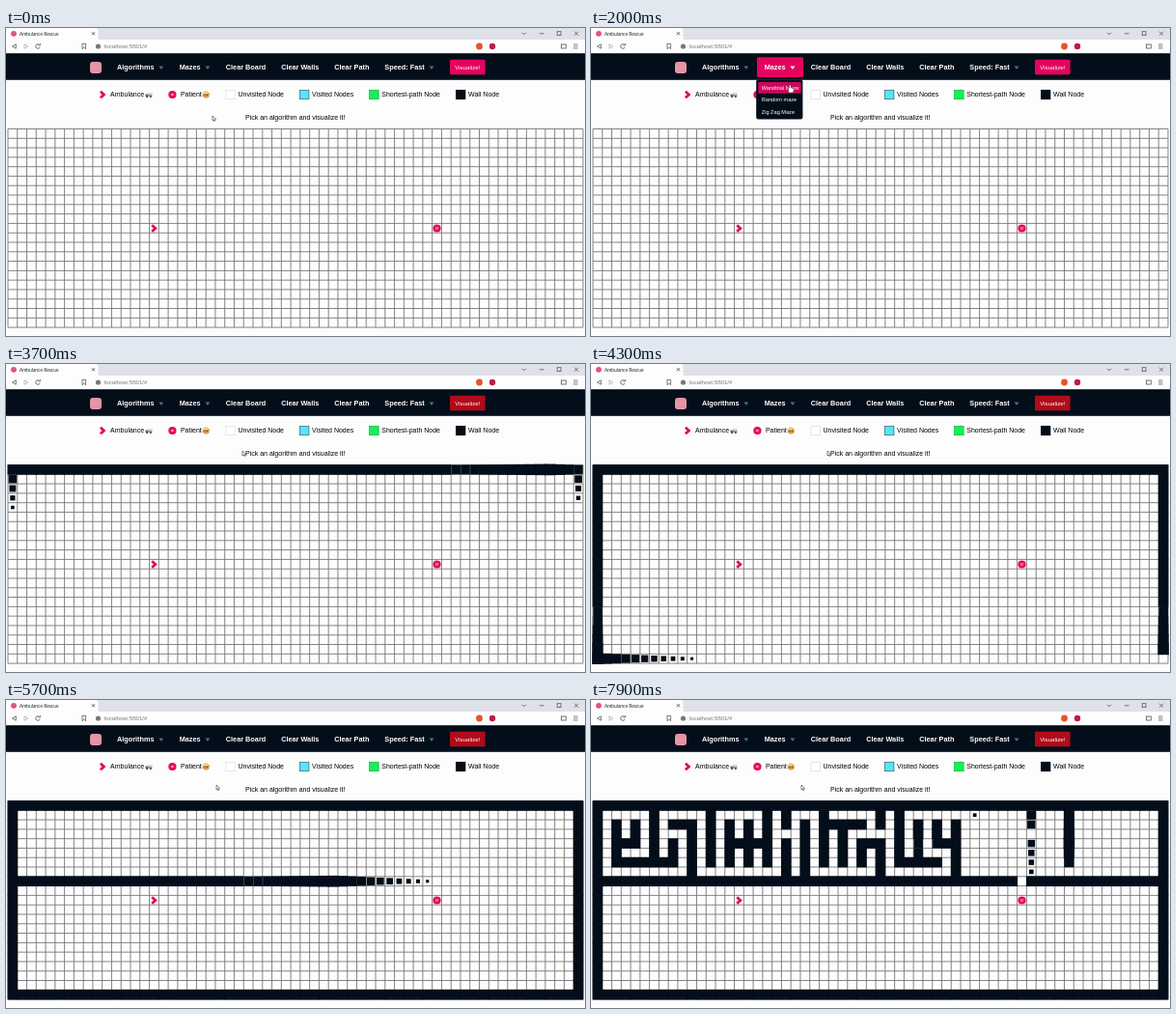
Recreate the animation shown at these times as an HTML page with a canvas. Size 600x319 px, loop 8 s.

```html
<!DOCTYPE html>
<html lang="en">
<head>
<meta charset="utf-8">
<title>Ambulance Rescue</title>
<style>
  html, body { margin: 0; width: 100%; height: 100%; overflow: hidden; background: #fdfdfd; }
  canvas { display: block; width: 600px; height: 319px; }
</style>
</head>
<body>
<canvas id="stage"></canvas>
<script>
const W = 600, H = 319, LOOP = 8000;
const canvas = document.getElementById('stage');
const dpr = window.devicePixelRatio || 1;
canvas.width = W * dpr;
canvas.height = H * dpr;
const g = canvas.getContext('2d');

const COLS = 61, ROWS = 21, X0 = 2, Y0 = 104.5, CW = 9.77, CH = 9.79;
const PAPER = '#fdfdfd', DARK = '#030e1a', PINK = '#e4045f', RED = '#b00b1b', INK = '#555';
const SANS = '"Liberation Sans", Arial, sans-serif';

const MENU_OPEN = 1500, PICKED = 2680, GROW = 300;

// pointer stops: arrival time, x, y
const STOPS = [[0, 214, 91], [1200, 196, 42], [1900, 206, 59], [3400, 245, 90], [5600, 218, 88]];
const GLIDE = 600;

// splits of the wide areas: wall position and its gap
const WIDE = [[8, 45], [38, 1], [22, 1], [10, 1], [6, 7], [12, 7], [20, 3], [18, 7],
  [30, 3], [24, 7], [32, 7], [50, 7], [46, 3], [40, 7]];

// the wall builder slows a little as the maze fills
const bornAt = i => 2740 + 14 * i + 0.0028 * i * i;

function buildWalls() {
  const cells = [];
  for (let r = 0; r < ROWS; r++)
    for (let c = 0; c < COLS; c++)
      if (!r || !c || r === ROWS - 1 || c === COLS - 1) cells.push([c, r]);

  const wide = WIDE.values();
  let bars = 0;

  // small rooms: bars wander up and down with gaps at alternate ends,
  // posts stand at the left with the gap at the outer end
  function pick(r0, r1, c0, c1, across) {
    if (!across) return [c0, r1 === 6 ? 7 : r0 - 1];
    const row = 4 + 2 * Math.round(0.8 * Math.cos(2 * Math.PI * (bars + 0.2) / 3.6));
    return [Math.min(r1, Math.max(r0, row)), bars++ % 2 ? c1 + 1 : c0 - 1];
  }

  function divide(r0, r1, c0, c1, across = r1 - r0 > c1 - c0) {
    if (r1 < r0 || c1 < c0) return;
    const choice = c1 - c0 >= 4 ? wide.next().value : pick(r0, r1, c0, c1, across);
    if (!choice) return;
    const [at, gap] = choice;
    const from = (across ? c0 : r0) - 1, to = (across ? c1 : r1) + 1;
    for (let k = from; k <= to; k++)
      if (k !== gap) cells.push(across ? [k, at] : [at, k]);
    if (across) {
      divide(r0, at - 2, c0, c1);
      divide(at + 2, r1, c0, c1);
    } else {
      divide(r0, r1, c0, at - 2);
      divide(r0, r1, at + 2, c1);
    }
  }
  divide(2, ROWS - 3, 2, COLS - 3, true);
  return cells;
}
const walls = buildWalls();

function rect(x, y, w, h, fill) {
  g.fillStyle = fill;
  g.fillRect(x, y, w, h);
}
function round(x, y, w, h, r, fill) {
  g.fillStyle = fill;
  g.beginPath();
  g.roundRect(x, y, w, h, r);
  g.fill();
}
function frame(x, y, w, h, color, width = 0.8) {
  g.strokeStyle = color;
  g.lineWidth = width;
  g.strokeRect(x, y, w, h);
}
function disc(x, y, r, fill) {
  g.fillStyle = fill;
  g.beginPath();
  g.arc(x, y, r, 0, Math.PI * 2);
  g.fill();
}
function arc(x, y, r, from, to, color) {
  g.strokeStyle = color;
  g.lineWidth = 0.8;
  g.beginPath();
  g.arc(x, y, r, from, to);
  g.stroke();
}
function line(points, color, width = 0.8) {
  g.strokeStyle = color;
  g.lineWidth = width;
  g.beginPath();
  for (const [x, y] of points) g.lineTo(x, y);
  g.stroke();
}
function poly(points, fill) {
  g.fillStyle = fill;
  g.beginPath();
  for (const [x, y] of points) g.lineTo(x, y);
  g.fill();
}
// returns the x where the text ends
function text(s, x, y, size, color, weight = '', family = SANS) {
  g.font = `${weight} ${size}px ${family}`;
  g.fillStyle = color;
  g.fillText(s, x, y);
  return x + g.measureText(s).width;
}
function cross(x, y, r, color, width) {
  line([[x - r, y - r], [x + r, y + r]], color, width);
  line([[x - r, y + r], [x + r, y - r]], color, width);
}
function chevron(x, y) {
  line([[x - 2.2, y - 3.2], [x + 1.4, y], [x - 2.2, y + 3.2]], PINK, 2.7);
}
function patient(x, y) {
  disc(x, y, 4.1, PINK);
  cross(x, y, 1.3, '#fbd3e2', 1);
}

function drawBrowser() {
  rect(0, 0, W, 12, '#dee1e6');
  round(0, 0, 95.5, 14, [0, 3, 0, 0], PAPER);
  rect(0, 12, W, 14, PAPER);
  disc(8, 5.8, 2.9, '#df5275');
  text('Ambulance Rescue', 14, 7.6, 4.9, '#222', '', 'Lato, "Open Sans", sans-serif');
  cross(90.5, 5.7, 1.5, '#333', 0.8);

  line([[535, 4.8], [537, 6.8], [539, 4.8]], INK);
  line([[553, 5.8], [557.5, 5.8]], INK);
  frame(571.2, 3.7, 3.8, 3.8, INK);
  cross(591, 5.7, 2, INK);

  line([[10.3, 16.8], [6.5, 19], [10.3, 21.2], [10.3, 16.8]], INK);
  line([[19, 16.8], [22.8, 19], [19, 21.2], [19, 16.8]], '#aaa');
  arc(33, 19, 2.3, 0.3, 5.4, INK);
  line([[35.4, 15.9], [35.4, 17.9], [33.4, 17.9]], INK);
  line([[79, 16.3], [82.6, 16.3], [82.6, 21.7], [80.8, 20], [79, 21.7], [79, 16]], INK);
  disc(95.5, 19, 2.6, '#777');
  text('localhost:5501/#', 102, 21.1, 6.1, '#777');
  disc(490.5, 19, 3.4, '#e2552c');
  disc(504, 19, 3.2, '#b91d4c');
  frame(575.5, 17, 4.8, 4, INK);
  for (const y of [17, 19, 21]) line([[588, y], [592.5, y]], INK, 0.7);
}

function drawNav(open, busy) {
  rect(0, 26.2, W, 27.6, DARK);
  round(87, 35, 12, 12, 3, '#e694a8');
  if (open) round(172, 30.3, 48, 20.8, 1.5, PINK);
  let x = 115;
  for (const label of ['Algorithms', 'Mazes', 'Clear Board', 'Clear Walls', 'Clear Path', 'Speed: Fast']) {
    x = text(label, x, 43.2, 7.3, '#fff', 'bold');
    if (!label.startsWith('Clear')) {
      const tip = x + 7.3;
      const color = open && label === 'Mazes' ? '#fff' : busy ? '#3f7182' : '#566675';
      poly([[tip - 2.5, 39.4], [tip + 2.5, 39.4], [tip, 43]], color);
      x += 10.2;
    }
    x += 16;
  }
  round(460, 32.8, 36.6, 15.4, 1.2, busy ? RED : PINK);
  text('Visualize!', 465.3, 42.8, 6.1, '#fff');
}

function ambulanceIcon(x) {
  rect(x + 3, 66.8, 4.5, 4.2, '#d3d6e2');
  rect(x + 0.5, 68.4, 2.8, 2.6, '#71809b');
  rect(x + 1, 69.4, 6.5, 1, '#d13f50');
  disc(x + 2.2, 71.2, 0.9, '#333');
  disc(x + 6, 71.2, 0.9, '#333');
}
function faceIcon(x) {
  disc(x + 3.7, 69, 3.6, '#dd9a45');
  line([[x + 1, 67.6], [x + 6.2, 66.7]], '#f5e6d3', 1.3);
  for (const eye of [2.5, 5]) disc(x + eye, 69.4, 0.6, '#593716');
}

function drawLegend() {
  const box = (fill, edge) => x => {
    rect(x, 64, 10, 10, fill);
    frame(x + 0.3, 64.3, 9.4, 9.4, edge, 0.7);
  };
  const entries = [
    ['Ambulance', x => chevron(x + 4.9, 69), ambulanceIcon],
    ['Patient', x => patient(x + 4.4, 69), faceIcon],
    ['Unvisited Node', box('#fff', '#d8dce0')],
    ['Visited Nodes', box('#56e6fb', '#48626c')],
    ['Shortest-path Node', box('#14f056', '#2db453')],
    ['Wall Node', box(DARK, DARK)],
  ];
  let x = 95.2;
  for (const [label, marker, icon] of entries) {
    marker(x);
    x = text(label, x + 12.9, 71.4, 7, '#000');
    if (icon) {
      icon(x + 0.8);
      x += 8.7;
    }
    x += 16.2;
  }
  text('Pick an algorithm and visualize it!', 248, 95, 7, '#000');
}

function drawMenu() {
  round(171.2, 53.6, 48.2, 40.8, 1.8, DARK);
  round(173.2, 56, 44.4, 11.8, 1, '#d0045a');
  ['Wandtrial Maze', 'Random maze', 'Zig Zag Maze'].forEach((s, i) =>
    text(s, 176.8, 63.8 + i * 12.5, 5.6, '#fff'));
}

function drawGrid() {
  const right = X0 + COLS * CW, bottom = Y0 + ROWS * CH;
  for (let c = 0; c <= COLS; c++) line([[X0 + c * CW, Y0], [X0 + c * CW, bottom]], '#777', 0.9);
  for (let r = 0; r <= ROWS; r++) line([[X0, Y0 + r * CH], [right, Y0 + r * CH]], '#777', 0.9);
}

function drawWalls(t) {
  walls.forEach(([c, r], i) => {
    const p = Math.min(1, (t - bornAt(i)) / GROW);
    if (p < 0) return;
    const x = X0 + c * CW, y = Y0 + r * CH;
    const scale = p < 0.5 ? 0.3 + 1.8 * p : 1.4 - 0.4 * p;
    const w = CW * scale + (p === 1 ? 0.8 : 0), h = CH * scale + (p === 1 ? 0.8 : 0);
    rect(x + (CW - w) / 2, y + (CH - h) / 2, w, h, DARK);
    if (p > 0.86 && p < 1) rect(x, y, 0.5, CH, 'rgba(190,200,210,.5)');
  });
}

function pointerAt(t) {
  let [, x, y] = STOPS[0];
  for (const [arrive, tx, ty] of STOPS) {
    const p = Math.min(1, Math.max(0, (t - arrive) / GLIDE + 1));
    const e = p * p * (3 - 2 * p);
    x += (tx - x) * e;
    y += (ty - y) * e;
  }
  return [x, y];
}

function drawPointer(t) {
  const [x, y] = pointerAt(t);
  if (t > 1050 && t < PICKED) {
    round(x - 1.8, y + 2.8, 6, 5.4, 1.6, '#222');
    round(x - 0.8, y - 0.5, 2.2, 6, 1.1, '#222');
    round(x - 1.3, y + 3.3, 5, 4.4, 1.3, '#fff');
    round(x - 0.3, y, 1.2, 5, 0.6, '#fff');
    return;
  }
  const tip = [[x, y], [x, y + 5], [x + 1.2, y + 4], [x + 2.3, y + 5.8], [x + 2.2, y + 3.8], [x + 3.5, y + 3.7], [x, y]];
  poly(tip, '#fff');
  line(tip, '#333', 0.6);
}

function draw(t) {
  const open = t >= MENU_OPEN && t < PICKED;
  g.setTransform(dpr, 0, 0, dpr, 0, 0);
  rect(0, 0, W, H, PAPER);
  drawBrowser();
  drawNav(open, t >= PICKED);
  drawLegend();
  drawGrid();
  drawWalls(t);
  chevron(X0 + 15.5 * CW, Y0 + 10.5 * CH + 0.2);
  patient(X0 + 45.5 * CW, Y0 + 10.5 * CH + 0.2);
  if (open) drawMenu();
  drawPointer(t);
}

const start = performance.now();
function tick() {
  draw((performance.now() - start) % LOOP);
  requestAnimationFrame(tick);
}
tick();
</script>
</body>
</html>
```
